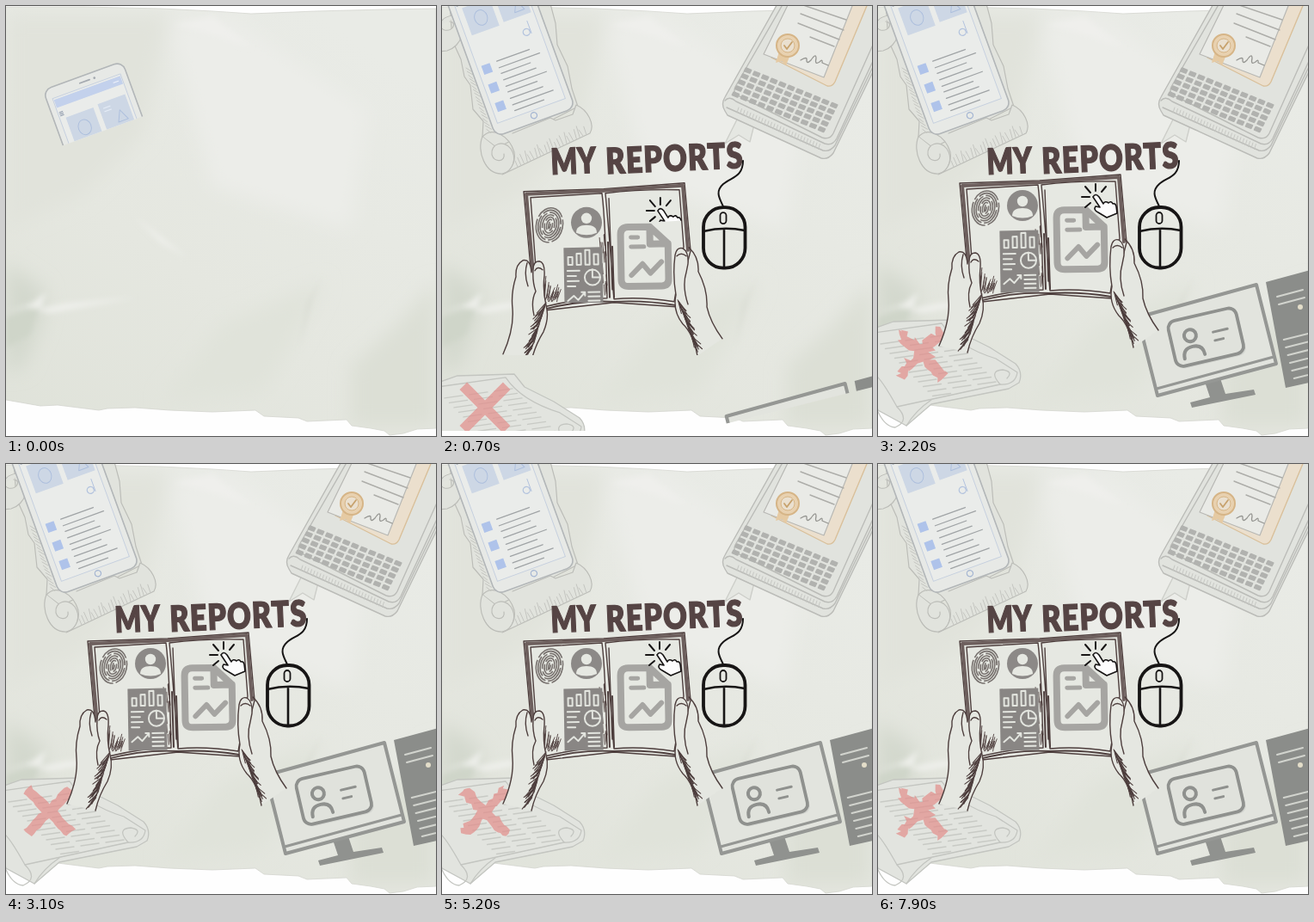
An HTML page that plays this animation: 500x500 px, repeating every 8 s.

```html
<!DOCTYPE html>
<html lang="en">
<head>
<meta charset="utf-8">
<title>My reports</title>
<style>
html, body { margin: 0; height: 100%; overflow: hidden; background: #fefefe; }
svg { display: block; width: 100%; height: 100%; }
path, line, polyline { stroke-linecap: round; stroke-linejoin: round; }
.n { fill: none; }
text { font: 900 34px Lato, "Open Sans", sans-serif; fill: #554444; stroke: #554444; stroke-width: 1.1; }
</style>
</head>
<body>
<svg viewBox="0 0 500 500">
<defs>
  <linearGradient id="tone" x1="0" y1="1" x2=".7" y2="0">
    <stop offset="0" stop-color="#dfe2d9"/><stop offset=".45" stop-color="#e5e7e0"/><stop offset="1" stop-color="#e9ebe6"/>
  </linearGradient>
  <filter id="soft" x="-50%" y="-50%" width="200%" height="200%"><feGaussianBlur stdDeviation="11"/></filter>
  <filter id="crease" x="-50%" y="-50%" width="200%" height="200%"><feGaussianBlur stdDeviation="3"/></filter>
  <clipPath id="sheet"><path id="edge" d="M0 1L90 1 180 3 240 6 285 9 360 6 440 4 500 3V491L478 492 462 497 446 499 440 494 424 491 402 488 396 481 350 483 340 479 300 477 290 470 240 472 190 470 150 467 118 468 108 470 60 464 40 465 0 458Z"/></clipPath>
  <clipPath id="screen"><path d="M7-185H91V-13H7Z"/></clipPath>
</defs>

<!-- torn paper -->
<use href="#edge" fill="url(#tone)" stroke="#d3d5cf" stroke-width=".8"/>
<g clip-path="url(#sheet)">
  <g filter="url(#soft)">
    <path d="M0 10L190 10 160 150 90 220 0 260Z" fill="#e1e3db"/>
    <path d="M0 300L45 330 42 365 20 420 0 425Z" fill="#d3d8cd"/>
    <path d="M500 320L455 370 400 420 400 490H500Z" fill="#dcdfd5"/>
    <path d="M370 320L340 380 300 450 180 460 250 370Z" fill="#e0e3da"/>
    <path d="M190 20L260 10 330 60 420 120 400 260 240 210Z" fill="#ecede9"/>
  </g>
  <g filter="url(#crease)">
    <path d="M0 356L30 346 47 333 40 352 70 346 150 339 50 357 25 350Z" fill="#eff0ec"/>
    <path d="M0 362L38 350 28 382 0 398Z" fill="#cfd5c9"/>
    <path d="M368 315L356 340 340 400 350 345Z" fill="#d9dcd3"/>
    <path d="M195 22L240 12 285 48 230 30Z" fill="#efefec"/>
    <path d="M150 245L210 292 180 275Z" fill="#eff0ec"/>
  </g>
</g>

<!-- parchment scroll -->
<g data-rise="62 205 -20 240 80">
  <g fill="#e1e3dd" stroke="#bcbdb8" stroke-width="1.2">
    <path d="M8-20L12 40 22 62 26 82 33 92 36 120 48 134 47 152 64 165 158 117 151 96 146 70 134 45 132 20 120-25Z"/>
    <path d="M20 12C0 8-8 24 3 28C14 30 17 18 9 18M20 12C30 22 24 46 6 52L-4 53V23"/>
    <path d="M47 152C40 168 50 196 70 195C84 192 87 176 80 166C72 155 56 160 58 173C61 183 74 181 72 172"/>
    <path d="M47 152C58 140 78 150 84 170C86 183 79 193 70 196L172 148C178 138 170 121 156 115L152 126 132 133 126 130 82 148"/>
  </g>
  <g id="scrollHatch" class="n" stroke="#c4c5c0"></g>
</g>

<!-- phone -->
<g data-rise="66.5 162 -20 205 -57">
  <g transform="translate(62 150) rotate(-20)">
    <rect x="0" y="-191" width="98" height="193" rx="10" fill="#e7e9e6" stroke="#b2b6b8" stroke-width="1.6"/>
    <path d="M7-178H91V-12H7Z" fill="#eaecea" stroke="#c6d0df"/>
    <path d="M43-184H55" stroke="#a5aab0" stroke-width="1.8"/><circle cx="61" cy="-184" r="1.4" fill="#a5aab0"/>
    <path d="M8-176H90V-166H8Z" fill="#c3d1ec"/><path d="M80-171H86" stroke="#eef2fa"/>
    <path d="M9-160h4m-4 2h4m-4 2h4" stroke="#8e99ab"/>
    <g fill="#cdd7e5" stroke="#adbfdd">
      <path d="M14-152h34v34h-34Z M54-154h34v34h-34Z" stroke="none"/>
      <ellipse cx="31" cy="-134" rx="7.5" ry="9" class="n"/>
      <path d="M76-139l6 13h-12Z" class="n"/>
      <path d="M59-147h8m-8 4h8" stroke="#e6edf7"/>
    </g>
    <path d="M80-112V-97" stroke="#b3c3de"/>
    <circle cx="75" cy="-100" r="4" class="n" stroke="#b3c3de" stroke-width="1.3"/>
    <g id="rows" clip-path="url(#screen)"></g>
    <circle cx="50" cy="-6" r="3.6" class="n" stroke="#a4b5d2" stroke-width="1.2"/>
  </g>
</g>

<!-- typewriter book with certificate -->
<g data-rise="327 164 22 250 80">
  <g fill="#e1e3de" stroke="#bbbcb8" stroke-width="1.4">
    <path d="M350 118L329 160 345 150 358 158 366 126Z" fill="#e5e7e2" stroke="#cdcec9"/>
    <path d="M392-6L329 106Q324 114 329 122L332 127 441 177Q449 179 455 171L510 58V-20Z"/>
    <path d="M329 110Q334 104 342 111L445 160Q454 163 459 154L510 45" class="n"/>
    <path d="M331 118L443 168Q451 170 457 162L510 52" class="n"/>
    <path d="M398-5L341 94Q338 101 344 104L442 153Q451 156 455 148L510 25" class="n"/>
  </g>
  <path d="M409-5L383 60 448 93Q454 94 457 88L496-5Z" fill="#ebdfcd" stroke="#d9c09b" stroke-width="1.4"/>
  <path d="M404-5L374 56 444 83 479-5Z" fill="#e9eae6" stroke="#b8b8b4" stroke-width="1.2"/>
  <path d="M420-1L470 16M417 9L467 28M414 20L462 39M428 36L456 47" class="n" stroke="#adada9" stroke-width="1.4"/>
  <path d="M392 53l-4 13 7-2 5 5 5-12Z" fill="#e5caa3"/>
  <circle cx="402" cy="46" r="13" fill="#e8d1b0" stroke="#d6b587" stroke-width="2"/>
  <circle cx="402" cy="46" r="8" fill="#eae0d0" stroke="#d6b587"/>
  <path d="M398 46l3 4 6-8" class="n" stroke="#c7a26d" stroke-width="1.8"/>
  <path d="M417 63q8-5 7 0q0 5 5 0q6-9 6-2q-2 8 4 4q4-4 3 1l7 3" class="n" stroke="#969692" stroke-width="1.3"/>
  <g id="keys" transform="translate(353 71) rotate(22) skewX(-5)" fill="#b1b2af"></g>
  <g id="bookHatch" stroke="#c6c7c3"></g>
</g>

<!-- desktop computer -->
<g data-rise="365 477 -14 170 650">
  <path d="M380 437L398 433 404 451 437 446 439 452 365 467 363 461 386 455Z" fill="#90928f"/>
  <path d="M302 362L440 324 463 416 325 453Z" fill="#e2e4de" stroke="#959794" stroke-width="4"/>
  <path d="M324 445L460 408" stroke="#959794" stroke-width="3"/>
  <g transform="translate(382 386) rotate(-13)" class="n" stroke="#8f918e" stroke-width="4">
    <rect x="-39" y="-27" width="81" height="56" rx="9" fill="#d3d5d0" stroke="none"/>
    <rect x="-41" y="-28" width="81" height="54" rx="9" fill="#e0e2dc" stroke-width="3.8"/>
    <circle cx="-18" cy="-7" r="7"/><path d="M-30 18Q-30 6-18 6T-6 18"/>
    <path d="M9-5H26M9 5H19" stroke-width="3"/>
  </g>
  <path d="M451 321L510 305V436L474 444Z" fill="#8b8d8a"/>
  <g id="tower" stroke="#d2d4ce" stroke-width="2"></g>
  <circle cx="491" cy="350" r="3" fill="#e3ddc9"/>
</g>

<!-- newspaper -->
<g data-rise="0 494 0 135 600">
  <g fill="#e2e4df" stroke="#c3c5c0" stroke-width="1.3">
    <path d="M-5 375L18 367 84 365 96 380 130 397 160 416Q169 426 164 438L152 445 62 463 33 488 0 470-5 455Z"/>
    <path d="M-5 380L74 369Q92 396 137 410L162 426Q160 441 142 440L22 466Q2 430-5 428Z"/>
    <path d="M142 440Q128 424 145 423Q158 425 150 433M22 466Q38 482 20 490Q4 489-5 458M62 458Q44 470 33 488" class="n"/>
  </g>
  <g id="print" class="n" stroke="#c8cac5" stroke-width="1.3"></g>
  <path id="cross" fill="#e38e8b" opacity=".7"/>
</g>

<!-- title -->
<g data-rise="127 208 -2.5 45 150"><text transform="translate(127 196) rotate(-2.5) scale(.95 1.22)">MY</text></g>
<g data-rise="192 207 -2.5 48 326"><text transform="translate(191 195) rotate(-2.5) scale(1 1.22)" letter-spacing="1.1">REPORTS</text></g>

<!-- mouse -->
<g data-rise="304 307 0 130 286">
  <g class="n" stroke="#171515" stroke-width="3.8">
    <path d="M350 180C350 199 336 199 327 207C317 216 323 224 327 233" stroke-width="2"/>
    <rect x="304" y="234" width="48.5" height="70.5" rx="23"/>
    <path d="M304 262Q328 256 352 261M328 260V303" stroke-width="2.6"/>
    <rect x="323.5" y="240" width="7" height="13" rx="3.5" stroke-width="1.8"/>
  </g>
</g>

<!-- book held by hands -->
<g data-rise="70 406 0 222 410">
  <g class="n" stroke="#4d3e3d" stroke-width="1.4">
    <path d="M95 206L188 203 282 196 289 275 272 340 200 335 121 344 107 339Z" fill="#e6e8e2"/>
    <path d="M98 209L188 205 280 199 286 274M98 209L109 337" stroke="#6d5f5d" stroke-width="4"/>
    <path d="M103 213L186 208Q190 240 192 330Q160 330 119 340L112 335Z"/>
    <path d="M190 208Q230 203 276 204L281 270 270 334Q232 328 200 331Q194 250 190 208M194 214L198 320"/>
    <path d="M193 265L195 329M198 270L200 329" stroke-width="2"/>
    <path d="M118 343Q160 332 199 334Q236 332 271 338" stroke-width="1.8"/>
    <g id="shade" stroke-width=".9"></g>
    <path d="M113 287Q106 287 106 297L104 300Q103 284 94 286Q85 291 86 305Q80 324 82 342Q84 366 71 395L104 403Q108 385 118 369Q125 353 121 338Q117 322 119 304Q120 288 113 287Z" fill="#e5e7e1" stroke="none"/>
    <path d="M104 403Q108 385 118 369Q125 353 121 338Q117 322 119 304Q120 288 113 287Q106 287 106 297Q105 311 109 322Q103 333 107 350M104 300Q103 284 94 286Q85 291 86 305Q80 324 82 342Q84 366 71 395M99 289Q95 302 100 316M108 298Q111 292 117 297"/>
    <path d="M271 280Q273 270 280 272Q287 276 286 290L284 300Q289 282 291 279Q299 284 298 299Q309 320 308 340Q312 358 326 377L297 397Q292 371 280 360Q268 345 272 326Q268 303 271 280" fill="#e5e7e1" stroke="none"/>
    <path d="M297 397Q292 371 280 360Q268 345 272 326Q268 303 271 280Q273 270 280 272Q287 276 286 290L284 300M287 271Q299 282 298 299Q309 320 308 340Q312 358 326 377M273 281Q278 276 284 281M284 300Q279 316 286 337"/>
    <g id="hands" stroke-width="1.1"></g>
  </g>
</g>
<g data-rise="100 345 0 150 480">
  <g id="finger" class="n" stroke="#77716e" stroke-width="1.6" transform="translate(125 235) rotate(12)"></g>
  <circle cx="168" cy="232" r="18" fill="#8c8987"/>
  <g fill="#e6e8e2"><circle cx="168" cy="227" r="6.2"/><path d="M156 244Q156 235 168 235T180 244Q168 249 156 244Z"/></g>
  <g transform="rotate(-1 164 298)">
    <path d="M142 261H187V333H142Z" fill="#898684"/>
    <g class="n" stroke="#e3e5df" stroke-width="2">
      <path d="M147 272h5v9h-5ZM157 268h5v13h-5ZM167 264h5v17h-5ZM177 269h5v12h-5ZM146 288h14m-14 6h10m-10 6h13m-13 6h9M146 323l7-6 5 5 8-9M162 313h4v4M170 313h13m-13 5h13m-13 5h13m-13 5h13"/>
      <circle cx="175" cy="296" r="9"/><path d="M175 287V296H184"/>
    </g>
  </g>
  <g class="n" stroke="#a6a5a2" stroke-width="8" transform="rotate(-1 235 270)">
    <path d="M242 237H217Q208 237 208 246V298Q208 306 217 306H255Q263 306 263 298V257ZV257H263"/>
    <path d="M220 293L233 280 242 291 255 278" stroke-width="6"/>
    <path d="M220 249H228M220 260H235" stroke-width="5"/>
  </g>
</g>
<g data-rise="235 252 -3 55 550">
  <path d="M253 207V215M241 210L247 217M237 222L246 222M241 234L247 229M265 210L260 216" stroke="#171515" stroke-width="2"/>
  <path d="M250 222Q253 217 257 222L262 230Q264 226 268 229Q271 226 273 230Q276 229 277 233L278 241 266 246 256 240Q250 237 253 233L258 234Z" fill="#fdfdfd" stroke="#171515" stroke-width="1.6"/>
</g>
</svg>
<script>
const $ = id => document.getElementById(id);
const fill = (id, n, f) => $(id).innerHTML = Array.from({ length: n }, (_, i) => f(i)).join('');
const seg = (x, y, dx, dy) => `<path d="M${x} ${y}l${dx} ${dy}"/>`;

function random(seed) {
  return () => (seed = (seed * 16807 + 11) % 2147483647) / 2147483647;
}

// Repeated strokes
const rough = random(421);
fill('scrollHatch', 40, i => i < 22
  ? seg(88 + i * 3.8, 187 - i * 1.8, -3 - i % 3, -7 - i % 4 * 2)
  : seg(28 + (i - 22) * 1.4, 72 + (i - 22) * 4.2, 5 + i % 3, 4));
fill('keys', 55, i => {
  const row = i / 11 | 0, x = i % 11 * 10.8;
  return `<rect x="${x}" y="${row * 7.8}" width="8.4" height="5.6" rx="1"/>`;
});
fill('bookHatch', 28, i => seg(345 + i * 3.5, 118 + i * 1.58, -2, 6));
fill('tower', 8, i => i < 2
  ? seg(464 + i * 2, 338 + i * 9, 30, -8)
  : seg(467 + i * 2.4, 370 + i * 9, 32, -8));
fill('print', 34, i => {
  const col = i % 3, row = i / 3 | 0;
  return seg(3 + col * 29 + row * 5.5, 393 - col * 4 + row * 5.5, 21, -3);
});
// Page shading: lower left corner, then beside the spine
fill('shade', 46, i => i < 26
  ? seg(112 + i * .9, 334 - rough() * 5, 1 + rough() * 5, -6 - rough() * (30 - i))
  : seg(183 + rough() * 8, 255 + rough() * 60, 1, 12));
// Wrist shading along the inner edge of each arm
fill('hands', 72, i => {
  const s = i % 36 / 36, len = 4 + rough() * 9;
  return i < 36
    ? seg(121 - 17 * s, 335 + 55 * s, -len, 8 + rough() * 7)
    : seg(274 + 20 * s, 332 + 50 * s, len * .8, 8 + rough() * 7);
});
fill('finger', 7, i =>
  `<ellipse rx="${1 + i * 2.4}" ry="${4 + i * 2.7}" stroke-dasharray="${12 + i * 4} 3" stroke-dashoffset="${i * 9}"/>`);
fill('rows', 3, i => `<g><path d="M12 ${-81 + i * 23}h10.5v11h-10.5Z" fill="#afc3ea"/>` +
  [0, 8, 15].map((dy, j) => `<path d="M31 ${-80 + i * 23 + dy}h${[40, 50, 36][j]}" stroke="#a0a4a6" stroke-width="1.3"/>`).join('') + '</g>');

// Each part rises from behind its own slanted base line
const parts = [...document.querySelectorAll('[data-rise]')].map((g, i) => {
  const [x, y, angle, dist, start] = g.dataset.rise.split(' ').map(Number);
  $('sheet').insertAdjacentHTML('afterend',
    `<clipPath id="base${i}"><path d="M-900 0H900V-900H-900Z" transform="translate(${x} ${y}) rotate(${angle})"/></clipPath>`);
  const outer = document.createElementNS('http://www.w3.org/2000/svg', 'g');
  outer.setAttribute('clip-path', `url(#base${i})`);
  g.replaceWith(outer);
  outer.append(g);
  const a = angle * Math.PI / 180;
  return { g, dx: -Math.sin(a) * dist, dy: Math.cos(a) * dist, start };
});

const left = (t, start, span) => (1 - Math.min(1, Math.max(0, (t - start) / span))) ** 3;

// Ragged cross, redrawn ten times a second
const arms = [[-6, -6], [-6, -35], [6, -35], [6, -6], [35, -6], [35, 6],
  [6, 6], [6, 35], [-6, 35], [-6, 6], [-35, 6], [-35, -6]];
const wear = '2454201010021121034';
function crossPath(step) {
  const k = step % wear.length, amp = wear[k] * 2.3, rnd = random(k * 7919 + 331);
  const points = [];
  arms.forEach(([x, y], i) => {
    const [nx, ny] = arms[(i + 1) % 12], n = Math.ceil(Math.hypot(nx - x, ny - y) / 5);
    for (let j = 0; j < n; j++) {
      const px = x + (nx - x) * j / n + (rnd() - .5) * amp;
      const py = y + (ny - y) * j / n + (rnd() - .5) * amp;
      points.push((50 + (px - py) * .72).toFixed(1) + ' ' + (404 + (px + py) * .72).toFixed(1));
    }
  });
  return 'M' + points.join('L') + 'Z';
}

function draw(now) {
  const t = now % 8000;
  for (const { g, dx, dy, start } of parts) {
    const k = left(t, start, 450);
    g.setAttribute('transform', `translate(${dx * k} ${dy * k})`);
  }
  const phase = t % 2200;
  [...$('rows').children].forEach((row, i) => {
    const k = phase < 1660 ? 0 : left(phase, 1660 + i * 50, 360);
    row.setAttribute('transform', `translate(0 ${70 * k})`);
    row.setAttribute('opacity', (1 - k) ** 2);
  });
  $('cross').setAttribute('d', crossPath(Math.floor(t / 100)));
}

const begin = performance.now();
function frame() {
  draw(performance.now() - begin);
  requestAnimationFrame(frame);
}
frame();
</script>
</body>
</html>
```
